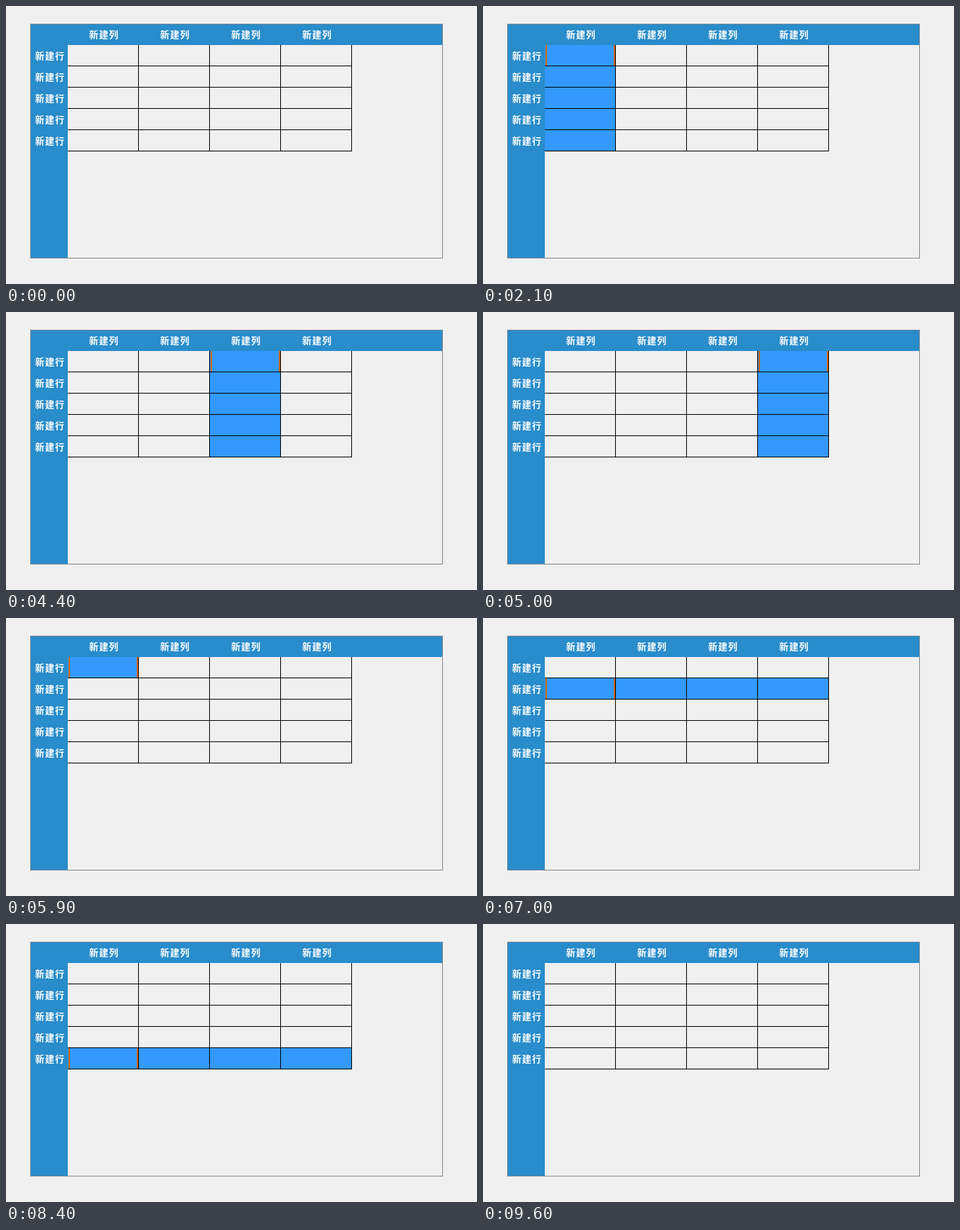
Animation, 663 px wide and 392 px high, one loop 9.8 s. Source, as an HTML page with a canvas:

```html
<!DOCTYPE html>
<html lang="zh-CN">
<head>
<meta charset="utf-8">
<title>表格选择</title>
<style>
  html, body { margin: 0; width: 100%; height: 100%; overflow: hidden; background: #f0f0f0; }
  canvas { display: block; }
</style>
</head>
<body>
<canvas id="stage" width="663" height="392"></canvas>
<script>
const ctx = document.getElementById('stage').getContext('2d');
const LOOP = 9800, COLS = 4, ROWS = 5, CELL_W = 100, CELL_H = 30, LEFT = 87, TOP = 55;
const BLUE = '#298ccb', SELECTED = '#3399ff', FOCUS = '#cc6600';

// Each step: start time, then first column, first row, columns and rows selected.
const steps = [
  [0], [2100, 0, 0, 1, ROWS], [3100, 1, 0, 1, ROWS],
  [3700, 2, 0, 1, 1], [4400, 2, 0, 1, ROWS], [5000, 3, 0, 1, ROWS],
  [5900, 0, 0, 1, 1], [6500, 0, 0, COLS, 1], [7000, 0, 1, COLS, 1],
  [7500, 0, 2, COLS, 1], [8000, 0, 3, COLS, 1], [8400, 0, 4, COLS, 1], [9600]
];

function box(color, x, y, w, h) {
  ctx.fillStyle = color;
  ctx.fillRect(x, y, w, h);
}

function label(text, x, y) {
  ctx.fillStyle = '#fff';
  ctx.fillText(text, x, y);
}

function drawSelection([, col, row, cols, rows]) {
  if (col === undefined) return;
  const x = LEFT + col * CELL_W, y = TOP + row * CELL_H;
  box(SELECTED, x, y, cols * CELL_W - 1, rows * CELL_H - 1);
  box(FOCUS, x + 1, y, 2, CELL_H - 1);
  box(FOCUS, x + CELL_W - 3, y, 2, CELL_H - 1);
}

function draw(time) {
  box('#f0f0f0', 0, 0, 663, 392);
  box('#828790', 34, 25, 581, 331);
  box('#f0f0f0', 35, 26, 579, 329);
  box(BLUE, 35, 26, 579, 29);
  box(BLUE, 35, 26, 52, 329);

  drawSelection(steps.findLast(step => step[0] <= time));

  ctx.font = 'bold 13px "Noto Sans CJK SC", "Noto Sans CJK", sans-serif';
  ctx.letterSpacing = '1px';
  ctx.textAlign = 'left';
  ctx.textBaseline = 'alphabetic';
  for (let c = 0; c < COLS; c++) {
    box('#000', LEFT + (c + 1) * CELL_W - 1, TOP, 1, ROWS * CELL_H);
    label('新建列', LEFT + c * CELL_W + 30, 45);
  }
  for (let r = 0; r < ROWS; r++) {
    box('#000', LEFT, TOP + (r + 1) * CELL_H - 1, COLS * CELL_W, 1);
    label('新建行', 41, TOP + r * CELL_H + 20);
  }
}

function tick() {
  draw(performance.now() % LOOP);
  requestAnimationFrame(tick);
}
tick();
</script>
</body>
</html>
```
